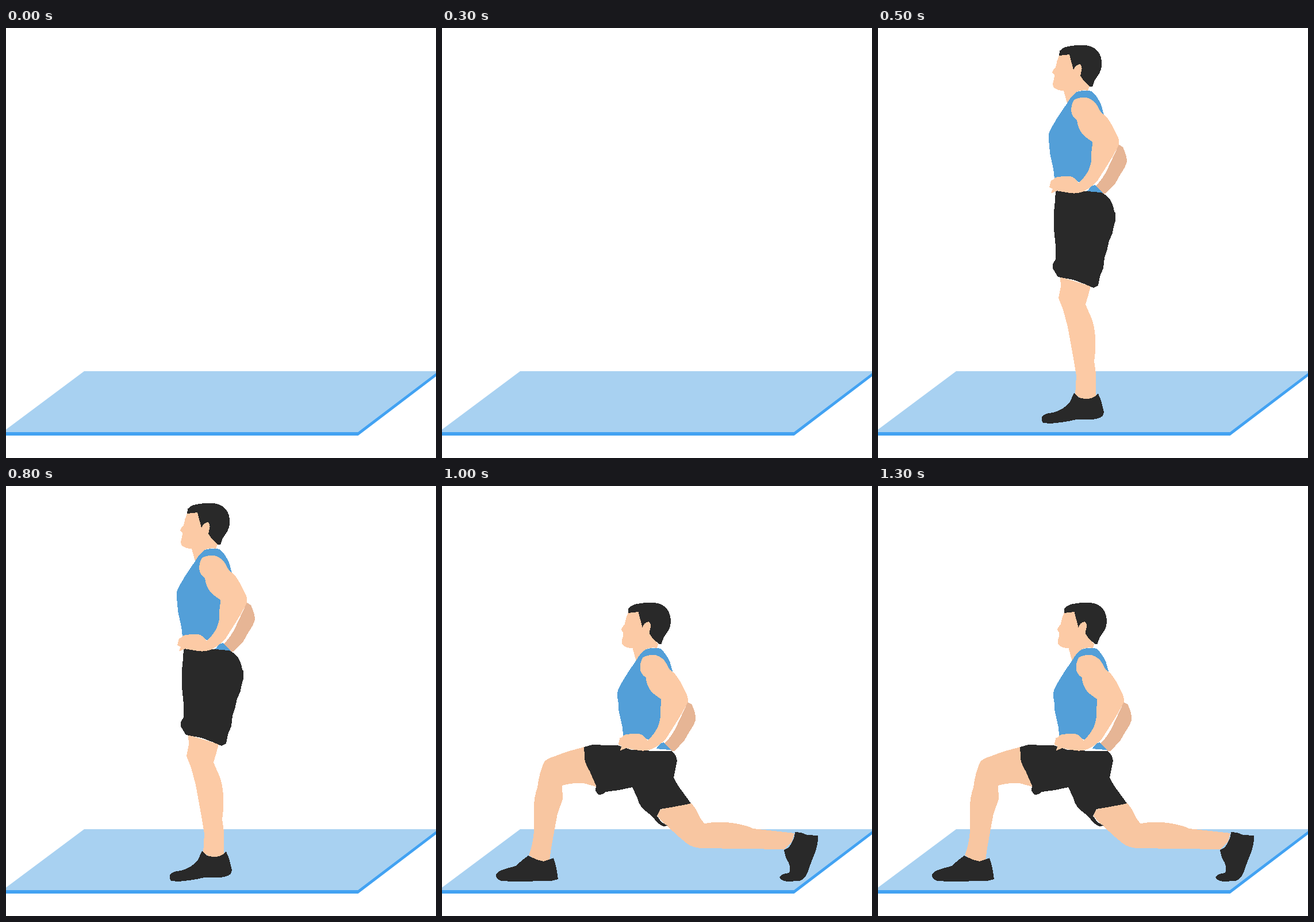
An HTML page for the animation above (1500 ms loop, 748 by 748 pixels).

```html
<!DOCTYPE html>
<html lang="en">
<head>
<meta charset="utf-8">
<title>Lunge exercise</title>
<style>
  html, body { margin: 0; width: 100%; height: 100%; overflow: hidden; background: #fff; }
  svg { display: block; width: 100%; height: 100%; }
  .pose { visibility: hidden; shape-rendering: crispEdges; }
  .skin { fill: #fccaa5; }
  .shade { fill: #e6b595; }
  .leg { fill: #f8c6a1; }
  .shirt { fill: #539fd8; }
  .dark { fill: #292929; }
</style>
</head>
<body>
<svg viewBox="0 0 748 748">
  <defs>
    <g id="torso">
      <path class="shade" d="M419 203L426 207Q433 222 433 233Q430 243 422 254L413 270L396 288L391 288L378 275Q388 267 398 248Z"/>
      <path class="shirt" d="M329 131Q336 118 346 111Q360 107 372 110Q381 118 388 133L393 151L380 200L370 245L352 268L307 262L305 245L299 218L298 203Q295 190 298 181Q308 160 329 131ZM364 284L371 275L377 273L391 287L387 286Z"/>
      <path class="dark" d="M315 48L316 40Q322 32 338 31Q352 28 367 31Q384 36 388 52Q392 66 385 79L377 91L373 102L369 102L350 85L339 73L333 46Z"/>
      <path class="skin" d="M315 48L333 46L340 73Q343 64 351 63Q356 66 354 74L352 83L358 92L368 102L365 109Q354 107 346 111Q336 118 329 131L323 109Q310 109 305 102Q303 96 306 90L307 82L303 77Q305 72 309 68Q311 57 315 48Z"/>
      <path class="skin" d="M341 125Q350 120 363 121Q377 125 383 138Q387 148 395 152Q405 163 413 181Q421 194 419 203Q410 222 398 240L381 267Q370 278 358 284Q345 289 335 287Q320 285 312 283Q306 285 303 287L301 287L304 280L298 277L301 265L305 264Q307 259 315 259Q328 256 338 259Q346 264 349 270Q360 260 367 246Q373 230 371 217Q373 205 373 198Q362 191 355 184Q347 172 346 160Q337 154 336 144Q336 133 341 125Z"/>
    </g>
  </defs>

  <path fill="#a8d1f1" d="M136 597H752L612 703H-6Z"/>
  <path fill="#42a2f2" d="M-6 703H612L752 597V603L612.5 709H-6Z"/>

  <g class="pose"></g>

  <g class="pose">
    <path class="skin" d="M317 433L370 449L366 464L361 481L368 497Q377 515 378 540Q379 560 376 580L379 600V638L381 640Q370 648 356 646L343 638L345 605L340 575L330 520L322 490L314 470L318 450Z"/>
    <path class="dark" d="M309 283L330 286H345L366 283L390 286L399 293Q409 303 411 320L413 321V335Q409 348 408 357L402 370L398 388L394 400L392 418L386 432L383 448L375 452L361 446L340 438L313 433L304 418V411L309 402V380L306 350V320L308 300Z"/>
    <path class="dark" d="M341 635L350 643Q367 648 377 641L383 636L388 648Q391 660 393 668L391 675Q382 681 370 681L345 681Q325 686 300 688L287 687Q284 684 285 676Q290 670 305 669Q325 663 334 650Z"/>
    <use href="#torso"/>
  </g>

  <g class="pose">
    <path class="leg" d="M247 454L218 462L188 473Q176 477 174 490Q168 505 166 525Q160 540 160 560V600Q158 625 151 642Q165 653 177 653L187 651L190 630Q197 590 201 570L210 545L209 521Q225 516 246 517L268 523L260 490Z"/>
    <path class="leg" d="M375 574Q376 566 382 562L410 555L433 552Q441 559 446 571Q451 582 457 587Q480 583 504 586Q530 590 541 596L613 604L609 618L596 632L450 630Q435 629 425 621Q405 605 392 591L383 584Z"/>
    <path class="dark" d="M247 454L262 450L290 451H305L330 459L370 461H400Q408 468 409 478L403 507Q408 518 417 530L433 552L425 554L398 559L380 562L374 574L382 585L393 591L385 592L376 587L365 574L350 562Q342 553 340 543L331 524L308 529L285 532Q278 538 272 537L267 530L268 521Q262 508 257 496Q247 480 248 470Z"/>
    <path class="dark" d="M150 643L165 650L177 653L194 647Q199 660 202 684L190 687L125 688L103 687Q93 683 94 676Q97 670 110 666L128 661Q140 650 150 643Z"/>
    <path class="dark" d="M614 602L625 603L635 607L654 608Q655 622 648 640Q640 660 636 672Q632 683 622 687L600 688Q588 686 587 680Q592 674 604 673Q607 665 603 655Q597 647 595 633L603 629Q610 619 613 610Z"/>
    <use href="#torso" x="8.5" y="173"/>
  </g>
</svg>
<script>
  const STEP = 500;
  const poses = document.querySelectorAll('.pose');

  function draw(now) {
    const current = Math.floor(now / STEP) % poses.length;
    poses.forEach((pose, i) => {
      pose.style.visibility = i === current ? 'visible' : 'hidden';
    });
    requestAnimationFrame(draw);
  }
  draw(0);
</script>
</body>
</html>
```
